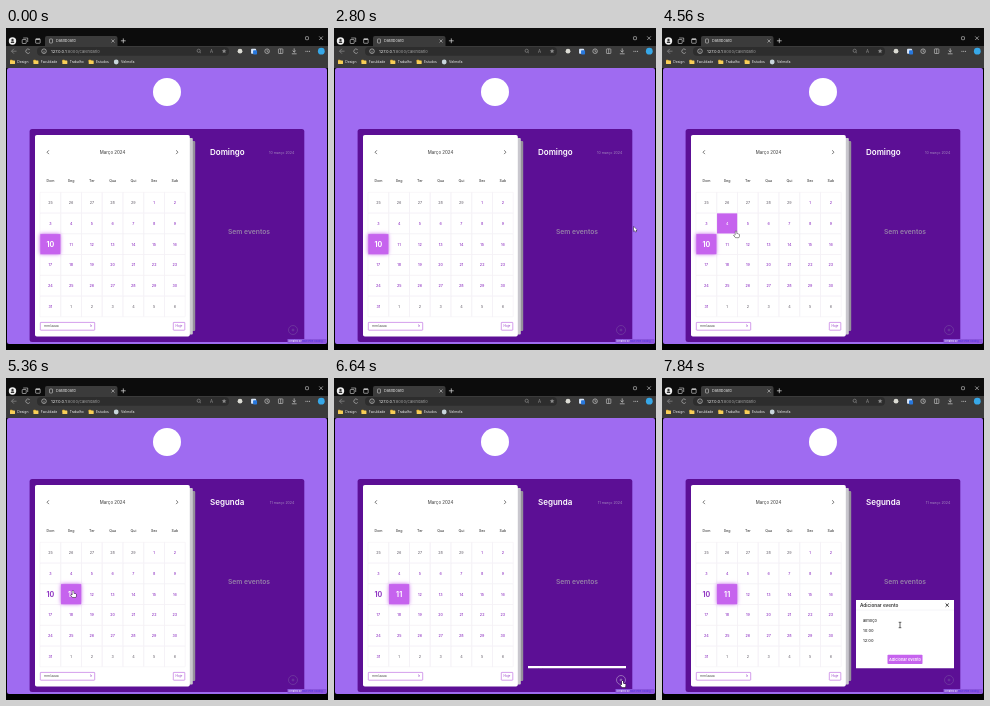
Write an HTML page with a canvas that moves like this. It is 322 by 322 pixels and loops after 8 s.

```html
<!DOCTYPE html>
<html lang="pt">
<head>
<meta charset="utf-8">
<title>Dashboard</title>
<style>
html, body { margin: 0; width: 100%; height: 100%; overflow: hidden; background: #000; }
canvas { display: block; width: 322px; height: 322px; }
</style>
</head>
<body>
<canvas id="stage"></canvas>
<script>
const SIZE = 322, LOOP = 8000, STEP = 80;
const PAGE = '#9f6bf1', CARD = '#5c0f95', PINK = '#c663ee', DAY = '#9238c4';
const MUTED = '#77727c', ICON = '#ccc', DIM = '#8c8c8c';
const TODAY = 10, CLICK_DAY = 5360, OPEN = 6614, PANEL = 68.3;
const grid = { x: 34, y: 164.3, cell: 20.75 };
const button = { x: 287, y: 302, r: 4.5 };

const canvas = document.getElementById('stage');
const c = canvas.getContext('2d');
const dpr = Math.max(1, window.devicePixelRatio || 1);
canvas.width = canvas.height = SIZE * dpr;

// pointer moves: start, duration, end point
const home = { x: 330, y: 226 };
const moves = [
  [80, 640, 238, 188],
  [1440, 80, 233, 181],
  [2080, 80, 299.8, 198.7],
  [3920, 640, 74, 203.3],
  [4960, 160, 67, 213],
  [5440, 400, 188, 202.5],
  [6000, 320, 288.5, 303],
  [6880, 960, 238, 247]
];

const clamp = v => Math.min(1, Math.max(0, v));
const smooth = v => v * v * (3 - 2 * v);

function pointerAt(t) {
  return moves.reduce((p, [start, span, x, y]) => {
    const k = smooth(clamp((t - start) / span));
    return { x: p.x + (x - p.x) * k, y: p.y + (y - p.y) * k };
  }, home);
}

// CSS "ease" curve, solved by bisection
function ease(x) {
  const bez = (s, p, q) => 3 * (1 - s) ** 2 * s * p + 3 * (1 - s) * s * s * q + s ** 3;
  let lo = 0, hi = 1;
  for (let i = 0; i < 20; i++) {
    const s = (lo + hi) / 2;
    if (bez(s, 0.25, 0.25) < x) lo = s; else hi = s;
  }
  return x <= 0 ? 0 : bez(hi, 0.1, 1);
}

function rect(x, y, w, h, fill, r = 0) {
  c.fillStyle = fill;
  c.beginPath();
  c.roundRect(x, y, w, h, r);
  c.fill();
}

function frame(x, y, w, h, color, r = 0.5) {
  c.strokeStyle = color;
  c.lineWidth = 0.6;
  c.beginPath();
  c.roundRect(x, y, w, h, r);
  c.stroke();
}

function disc(x, y, r, fill) {
  c.fillStyle = fill;
  c.beginPath();
  c.arc(x, y, r, 0, 7);
  c.fill();
}

function ring(x, y, r, color, gap = 0) {
  c.strokeStyle = color;
  c.lineWidth = 0.65;
  c.beginPath();
  c.arc(x, y, r, gap, 2 * Math.PI - gap);
  c.stroke();
}

function line(color, lw, ...p) {
  c.strokeStyle = color;
  c.lineWidth = lw;
  c.beginPath();
  for (let i = 0; i < p.length; i += 2) c.lineTo(p[i], p[i + 1]);
  c.stroke();
}

function cross(x, y, r, color, lw = 0.6) {
  line(color, lw, x - r, y - r, x + r, y + r);
  line(color, lw, x + r, y - r, x - r, y + r);
}

function plus(x, y, r, color, lw = 0.7) {
  line(color, lw, x - r, y, x + r, y);
  line(color, lw, x, y - r, x, y + r);
}

// arrow head pointing left (-1) or right (1)
function chevron(x, y, r, dir, color) {
  line(color, 0.8, x - dir * r, y - r, x, y, x - dir * r, y + r);
}

function box(x, y, w, h, color) {
  frame(x - w / 2, y - h / 2, w, h, color);
}

function text(str, x, y, size, color, weight = 400, align = 'left') {
  c.font = `${weight} ${size}px Inter, "Open Sans", sans-serif`;
  c.textAlign = align;
  c.fillStyle = color;
  c.fillText(str, x, y + size * 0.36);
  return x + c.measureText(str).width;
}

// draws each icon around its own centre, evenly spaced
function iconRow(x, y, gap, icons) {
  icons.forEach((icon, i) => {
    c.save();
    c.translate(x + i * gap, y);
    icon();
    c.restore();
  });
}

function star() {
  c.fillStyle = DIM;
  c.beginPath();
  for (let i = 0; i < 10; i++) {
    const r = i % 2 ? 1.1 : 2.5, a = (i / 5 - 0.5) * Math.PI;
    c.lineTo(r * Math.cos(a), r * Math.sin(a));
  }
  c.fill();
}

function drawTabs() {
  rect(0, 0, SIZE, SIZE, '#000');
  rect(0, 0, SIZE, 18, '#0c0c0c');
  iconRow(6.5, 13, 12.7, [
    () => { disc(0, 0, 3.7, '#eee'); disc(0, -1, 1.2, '#333'); rect(-1.7, 0.6, 3.4, 1.5, '#333', 0.7); },
    () => { box(-1, 0.5, 4, 4, '#ddd'); line('#ddd', 0.6, -2, -3, 2.5, -3, 2.5, 1); },
    () => { box(0, 0, 4.5, 4.5, '#ddd'); line('#ddd', 1, -2, -1.7, 2, -1.7); }
  ]);
  rect(39, 8, 72.5, 12, '#3b3b3b', 2);
  box(45, 13, 3, 4, ICON);
  text('Dashboard', 50, 12.8, 3.8, '#e4e4e4');
  cross(107, 13, 1.5, ICON);
  plus(117.3, 12.8, 2.4, '#ddd');
  box(301, 10.2, 3, 3, ICON);
  cross(315, 10.2, 1.8, '#ddd');
}

function drawToolbar() {
  const y = 23.2;
  rect(0, 18, SIZE, 22, '#3b3b3b');
  line(DIM, 0.7, 10.5, y, 5.5, y);
  chevron(5.5, y, 2.4, -1, DIM);
  ring(22, y, 2.2, '#bbb', 0.6);
  rect(31, 18.9, 192, 8.8, '#2d2d2d', 4);
  ring(38, y, 2.3, ICON);
  line(ICON, 0.6, 38, y - 0.5, 38, y + 1.4);
  const end = text('127.0.0.1', 45, y, 4.1, '#eee');
  text(':8000/calendario', end, y, 4.1, '#a0a0a0');

  iconRow(192.7, y, 12.7, [
    () => { ring(0, -0.4, 1.6, DIM); line(DIM, 0.6, 1, 0.7, 2.3, 2); },
    () => text('A', 0, 0, 4.4, DIM, 400, 'center'),
    star
  ]);
  iconRow(234, y, 13.55, [
    () => disc(0, 0, 2.4, '#dcdcd4'),
    () => { rect(-2.5, -2.5, 5, 5, '#d9e7fa', 0.8); rect(-0.5, -1, 4, 4.4, '#2878dc', 0.8); },
    () => { ring(0, 0, 2.3, ICON); line(ICON, 0.6, 0, -1.6, 0, 0.3, 1.4, 0.8); },
    () => { box(0, 0, 4.4, 4.6, ICON); line(ICON, 0.6, 0, -2.3, 0, 2.3); },
    () => {
      line(ICON, 0.7, 0, -2.8, 0, 1);
      line(ICON, 0.7, -1.6, -0.6, 0, 1, 1.6, -0.6);
      line(ICON, 0.7, -2.4, 2.6, 2.4, 2.6);
    },
    () => { for (let i = -1; i <= 1; i++) disc(i * 1.8, 0, 0.5, '#ddd'); },
    () => disc(0, 0, 3.4, '#37a8e8')
  ]);

  let x = 4;
  for (const label of ['Design', 'Faculdade', 'Trabalho', 'Estudos']) {
    rect(x, 31.8, 2.4, 2, '#e0a829', 0.4);
    rect(x, 32.5, 5, 3.6, '#f8cf58', 0.5);
    x = text(label, x + 7.3, 34, 3.4, '#eee') + 5;
  }
  disc(110.2, 34, 2.4, '#c9d6dc');
  text('Velmofa', 115, 34, 3.5, '#eee');
}

function cellAt(p) {
  const col = Math.floor((p.x - grid.x) / grid.cell);
  const row = Math.floor((p.y - grid.y) / grid.cell);
  return col >= 0 && col < 7 && row >= 0 && row < 6 ? row * 7 + col : -1;
}

function drawDay(i, active, hover) {
  const s = grid.cell, day = i - 4;
  const x = grid.x + (i % 7) * s, y = grid.y + Math.floor(i / 7) * s;
  const inMonth = day >= 1 && day <= 31;
  const on = inMonth && day === active;
  const big = on || day === TODAY;
  const label = day < 1 ? 29 + day : day > 31 ? day - 31 : day;
  if (on || i === hover) {
    c.save();
    c.shadowColor = PINK;
    c.shadowBlur = on ? 4 * dpr : 0;
    rect(x + 0.3, y + 0.3, s - 0.6, s - 0.6, PINK);
    c.restore();
  }
  const color = on || i === hover ? '#fff' : inMonth ? DAY : MUTED;
  text(label, x + s / 2, y + s / 2, big ? 7 : 3.7, color, big ? 700 : 500, 'center');
}

function drawCalendar(active, hover) {
  const s = grid.cell;
  rect(23.6, 101, 274.7, 213, CARD, 2.5);
  rect(180, 113, 9.2, 190, '#95909b', 1);
  rect(180, 110, 6.8, 196.5, '#c9c7ce', 1);
  rect(29, 107, 154.8, 201.5, '#fff', 1.8);

  chevron(41, 124.2, 1.9, -1, '#555');
  chevron(172, 124.2, 1.9, 1, '#555');
  text('Março 2024', 106.5, 124, 4.4, '#555', 500, 'center');
  ['Dom', 'Seg', 'Ter', 'Qua', 'Qui', 'Sex', 'Sab'].forEach((d, i) =>
    text(d, grid.x + s * (i + 0.5), 152.8, 3.6, '#454545', 500, 'center'));

  for (let i = 0; i < 42; i++) {
    frame(grid.x + (i % 7) * s, grid.y + Math.floor(i / 7) * s, s, s, '#f3f0f5', 0);
  }
  for (let i = 0; i < 42; i++) drawDay(i, active, hover);

  frame(34.3, 294.4, 54.4, 7.8, '#b85ddd');
  text('mm/aaaa', 38, 298.2, 3.4, '#555');
  text('Ir', 85, 298.2, 3.2, DAY, 400, 'center');
  frame(167.3, 294.4, 11.5, 7.8, '#b85ddd');
  text('Hoje', 173, 298.2, 3.2, DAY, 400, 'center');
}

function drawEvents(active, overPlus) {
  text(active === TODAY ? 'Domingo' : 'Segunda', 204, 124.3, 8, '#fff', 600);
  text(active + ' março 2024', 288.3, 124.4, 3.6, '#a286bd', 400, 'right');
  text('Sem eventos', 243, 203.2, 6.75, '#9580a8', 600, 'center');
  const tone = overPlus ? '#b49acb' : '#7546a1';
  ring(button.x, button.y, button.r, tone);
  plus(button.x, button.y, 1.4, tone);
}

function drawPanel(h) {
  if (h <= 0) return;
  const x = 194, w = 98, top = 290.4 - h;
  c.save();
  c.beginPath();
  c.rect(x, top, w, h);
  c.clip();
  rect(x, top, w, h, '#fff');
  text('Adicionar evento', x + 4, top + 5, 4.7, '#333', 600);
  cross(285.2, top + 5, 1.6, '#222', 0.9);
  line('#ebe8ee', 0.5, x, top + 10, x + w, top + 10);
  ['almoço', '10:00', '12:00'].forEach((s, i) =>
    text(s, x + 7, top + 20 + i * 10.2, 4, '#333', 500));
  rect(225.5, top + 54.7, 35, 9.3, PINK, 0.8);
  text('Adicionar evento', x + w / 2, top + 59.2, 3.9, '#fff', 600, 'center');
  c.restore();
}

function drawPointer(p, kind) {
  c.save();
  c.translate(p.x, p.y);
  c.lineJoin = 'round';
  if (kind === 'beam') {
    line('#222', 0.7, 0, -2.6, 0, 2.6);
    for (const y of [-2.7, 2.7]) line('#222', 0.7, -1.3, y, 1.3, y);
  } else {
    const shape = new Path2D(kind === 'hand'
      ? 'M-.6 0H.6V2.5L3.2 3.2 2.8 6.3H-.5L-2.2 4 -.6 4Z'
      : 'M0 0V4.6L1.1 3.6 1.9 5.3 2.7 4.9 1.9 3.3H3.3Z');
    c.strokeStyle = '#111';
    c.lineWidth = 0.8;
    c.stroke(shape);
    c.fillStyle = '#fff';
    c.fill(shape);
  }
  c.restore();
}

function draw(time) {
  const t = Math.floor((time % LOOP) / STEP) * STEP;
  const p = pointerAt(t);
  const hover = cellAt(p);
  const active = t < CLICK_DAY ? TODAY : TODAY + 1;
  const overPlus = Math.hypot(p.x - button.x, p.y - button.y) < button.r;
  const panel = PANEL * ease(clamp((t - OPEN) / 500));
  const overField = panel > 60 && p.x < 288 && p.y > 236 && p.y < 268;

  c.setTransform(dpr, 0, 0, dpr, 0, 0);
  drawTabs();
  drawToolbar();
  rect(1, 40, 320, 276, PAGE, 2);
  disc(161, 64, 14, '#fff');
  drawCalendar(active, hover);
  drawEvents(active, overPlus);
  drawPanel(panel);

  rect(281.5, 311, 39, 4.6, '#8a55dc', 0.6);
  text('Created by', 282.6, 313.3, 2.5, '#fff');
  text('Blue Pine Coding', 296.3, 313.3, 2.5, '#4a2ce0');

  drawPointer(p, overField ? 'beam' : hover >= 0 || overPlus ? 'hand' : 'arrow');
}

const start = performance.now();
function tick() {
  draw(performance.now() - start);
  requestAnimationFrame(tick);
}
tick();
</script>
</body>
</html>
```
